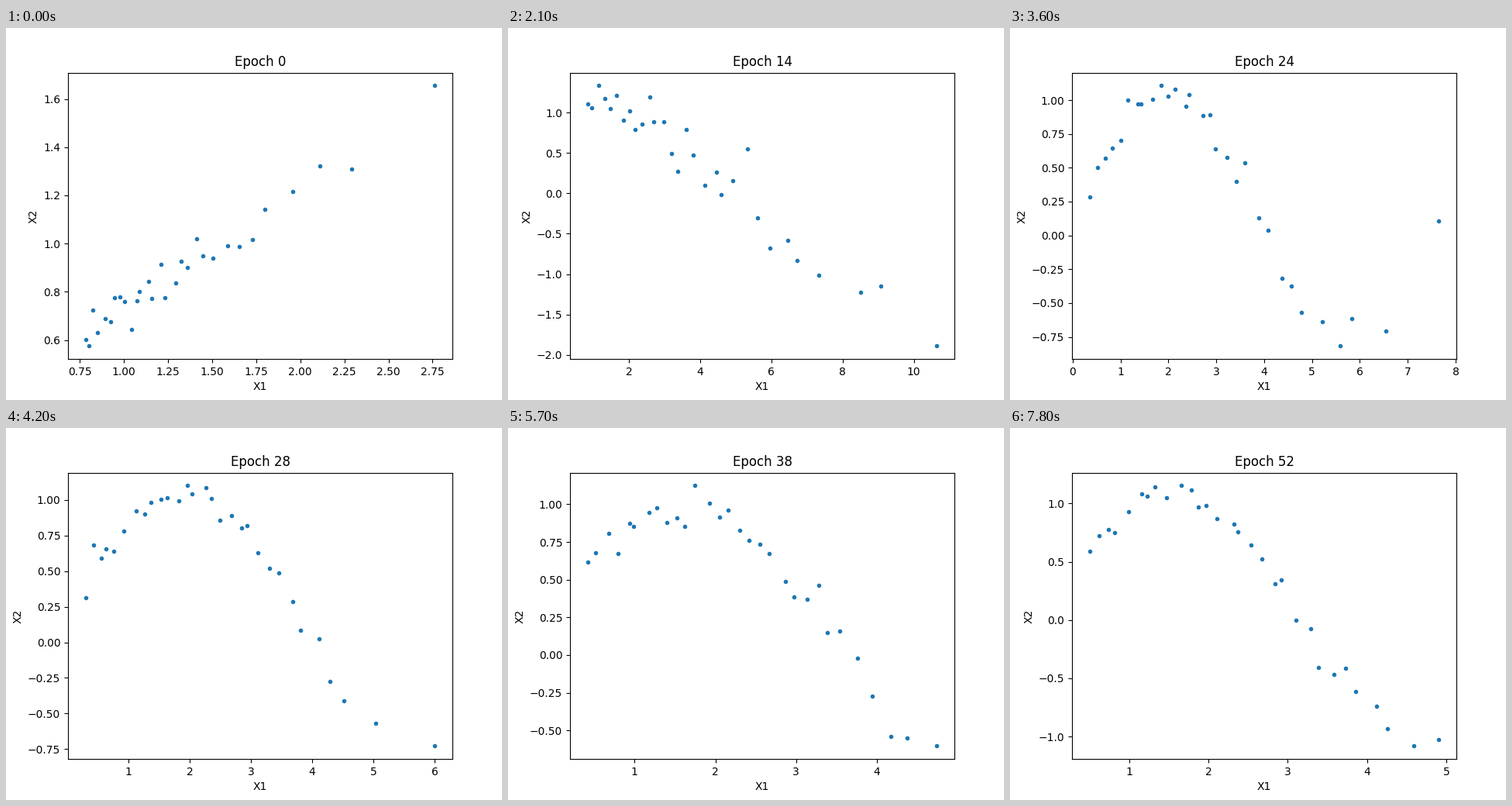
These frames come from a looping animation (640x480 px, 8 s). A matplotlib script:

```python
import numpy as np
import matplotlib.pyplot as plt
from matplotlib.animation import FuncAnimation

INTERVAL = 100
FRAMES = 80
HOLD = 3          # frames per plotted epoch
EPOCH_STEP = 2
COUNT = 30
NOISE = 0.05      # scatter relative to the height of the cloud

# Extent of the cloud at key epochs: x low, x high, y low, y high
EXTENT = {
    0: (.783, 2.763, .575, 1.655),
    8: (.643, 12.288, -1.121, 1.173),
    18: (.965, 9.56, -2.402, 1.438),
    24: (.353, 7.65, -.818, 1.107),
    32: (.238, 4.361, -.639, 1.093),
    44: (.595, 5.126, -.569, 1.154),
    52: (.498, 4.907, -1.082, 1.153),
}


def rescale(values, low, high):
    return low + (high - low) * (values - values.min()) / np.ptp(values)


def spread_along_x(epoch, rng):
    """Quantiles moving from a long-tailed to an even distribution."""
    q = (np.arange(COUNT) + .5 + rng.uniform(-.35, .35, COUNT)) / COUNT
    tail = rescale(-np.log(1 - q), 0, 1)
    evenness = np.interp(epoch, [0, 18, 32], [.2, .3, .75])
    return rescale((1 - evenness) * tail + evenness * q, 0, 1)


def curve(x, u, epoch, rng):
    """A rising line forks, tips over and bends into a sine wave."""
    slope = np.interp(epoch, [0, 8, 18], [.55, -.16, -.42])
    upper_slope = np.interp(epoch, [0, 8, 18], [.55, .08, -.42])
    upper = (u < .47) & (rng.random(COUNT) < .6)
    line = 1.4 + np.where(upper, upper_slope, slope) * x
    frequency = np.interp(epoch, [18, 32, 44], [.75, .87, 1])
    bend = np.interp(epoch, [18, 24], [0, 1])
    return (1 - bend) * line + bend * np.sin(frequency * x)


def samples(epoch):
    rng = np.random.default_rng(epoch)
    x_low, x_high, y_low, y_high = (
        np.interp(epoch, list(EXTENT), side) for side in zip(*EXTENT.values()))
    u = spread_along_x(epoch, rng)
    x = rescale(u, x_low, x_high)
    y = curve(x, u, epoch, rng)
    y += NOISE * np.ptp(y) * rng.normal(size=COUNT)
    return x, rescale(y, y_low, y_high)


fig, ax = plt.subplots(figsize=(6.4, 4.8), dpi=100)


def update(frame):
    epoch = EPOCH_STEP * (frame // HOLD)
    ax.clear()
    ax.plot(*samples(epoch), ".", color="tab:blue")
    ax.set(title=f"Epoch {epoch}", xlabel="X1", ylabel="X2")


anim = FuncAnimation(fig, update, frames=FRAMES, interval=INTERVAL,
                     init_func=lambda: update(0), repeat=True, repeat_delay=0)
plt.show()
```
